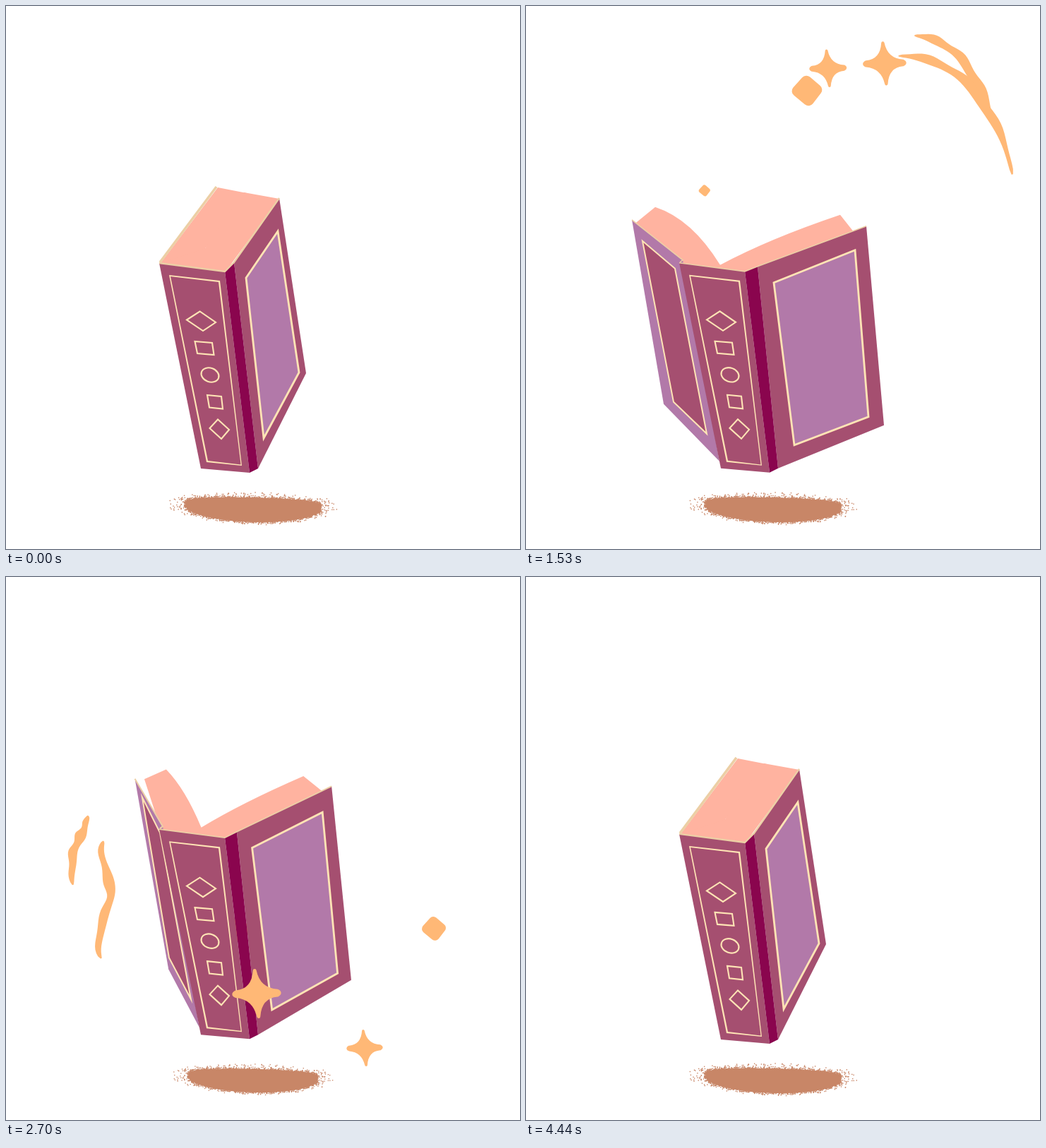
An HTML page with a canvas for the animation above (4470 ms loop, 728 by 769 pixels).

```html
<!DOCTYPE html>
<html lang="en">
<head>
<meta charset="utf-8">
<title>Floating spell book</title>
<style>
  html, body { margin: 0; width: 100%; height: 100%; overflow: hidden; background: #fff; }
  canvas { display: block; }
</style>
</head>
<body>
<canvas id="stage" width="728" height="769"></canvas>
<script>
const ctx = document.getElementById('stage').getContext('2d');
const LOOP = 4470, STEP = 30, BOB = 1490, TRAIL = 200;
const COVER = '#a54f70', HINGE = '#8a054e', LILAC = '#b279a9', CREAM = '#ffe4b5',
      EDGE = '#eccfa5', PAGE = '#ffb3a0', SPARK = '#ffb876', SHADOW = '#c88667';

const smooth = v => { v = Math.min(1, Math.max(0, v)); return v * v * (3 - 2 * v); };
const mix = (a, b, k) => a.map((v, i) => v + (b[i] - v) * k);

function trace(p) {
  ctx.beginPath();
  for (let i = 0; i < p.length; i += 2) ctx.lineTo(p[i], p[i + 1]);
}
function fill(p, color) {
  trace(p);
  ctx.fillStyle = color;
  ctx.fill();
}
function line(p, color, width, closed = true) {
  trace(p);
  if (closed) ctx.closePath();
  ctx.strokeStyle = color;
  ctx.lineWidth = width;
  ctx.stroke();
}

// A swirl turns clockwise round the book: key points [time, x, y, size] become angle and radius
const CX = 340, CY = 400;
function swirl(...points) {
  let last = -Infinity;
  return points.map(([t, x, y, size = 1]) => {
    let angle = Math.atan2(y - CY, x - CX);
    while (last > -9 && angle < last - 1) angle += 2 * Math.PI;
    last = angle;
    return [t, angle, Math.hypot(x - CX, y - CY), size];
  });
}
function locate(keys, t) {
  const end = keys.length - 1;
  t = Math.min(keys[end][0], Math.max(keys[0][0], t));
  let i = 0;
  while (i < end - 1 && keys[i + 1][0] < t) i++;
  const a = keys[i], b = keys[i + 1], span = b[0] - a[0], s = (t - a[0]) / span;
  const slope = (j, c) => {
    const p = keys[Math.max(0, j - 1)], n = keys[Math.min(end, j + 1)];
    return (n[c] - p[c]) / (n[0] - p[0]) * span;
  };
  const [angle, radius, size] = [1, 2, 3].map(c => a[c] + (b[c] - a[c]) * smooth(s)
    + slope(i, c) * s * (1 - s) ** 2 - slope(i + 1, c) * s * s * (1 - s));
  return [CX + radius * Math.cos(angle), CY + radius * Math.sin(angle), size];
}

const sparks = [
  { shape: star, keys: swirl([900, 285, 340, 0], [1140, 347, 160, 31], [1890, 671, 166, 27],
    [2700, 355, 590, 35], [3210, 97, 396, 21], [3700, 245, 310, 0]) },
  { shape: gem, keys: swirl([960, 282, 330, 0], [1140, 280, 240, 21], [1890, 591, 178, 18],
    [2700, 330, 500, 17], [3210, 89, 378, 14], [3720, 245, 310, 0]) },
  { shape: star, keys: swirl([1110, 345, 290, 0], [1140, 354, 266, 4], [1500, 420, 95, 26],
    [1890, 540, 98, 27], [2700, 508, 667, 26], [3210, 143, 487, 33], [3960, 244, 243, 31],
    [4200, 290, 330, 0]) },
  { shape: gem, keys: swirl([1300, 280, 340, 0], [1890, 313, 137, 18], [2700, 606, 498, 17],
    [3210, 224, 586, 22], [3480, 38, 430, 22], [3960, 216, 335, 21], [4150, 285, 350, 0]) }
];
const trails = [
  swirl([880, 300, 330], [940, 424, 196], [1140, 446, 98], [1400, 600, 60], [1690, 651, 352],
    [1890, 500, 510], [2500, 95, 436], [2700, 116, 338], [3010, 153, 203], [3210, 218, 205],
    [3400, 250, 310]),
  swirl([860, 285, 340], [940, 320, 203], [1140, 375, 150], [1400, 600, 90], [1690, 660, 433],
    [1890, 576, 500], [2500, 135, 540], [2600, 148, 450], [2700, 138, 374], [3000, 250, 320])
];

function blob(x, y, r, round, draw) {
  ctx.save();
  ctx.translate(x, y);
  ctx.scale(r, r);
  ctx.beginPath();
  draw();
  ctx.closePath();
  ctx.lineJoin = 'round';
  ctx.lineWidth = round;
  ctx.fillStyle = ctx.strokeStyle = SPARK;
  ctx.fill();
  ctx.stroke();
  ctx.restore();
}
function star(x, y, r) {
  blob(x, y, r, .14, () => {
    ctx.moveTo(-.08, -.93);
    ctx.quadraticCurveTo(.08, -.16, .84, -.11);
    ctx.quadraticCurveTo(1, -.03, .84, .06);
    ctx.quadraticCurveTo(.13, .12, .08, .93);
    ctx.quadraticCurveTo(-.1, .16, -.84, .1);
    ctx.quadraticCurveTo(-1, .03, -.84, -.06);
    ctx.quadraticCurveTo(-.13, -.12, -.08, -.93);
  });
}
function gem(x, y, r) {
  blob(x, y, r, .74, () => {
    for (const [px, py] of [[-.04, -.63], [.63, -.06], [.1, .62], [-.63, .02]]) ctx.lineTo(px, py);
  });
}

function drawTrail(keys, t) {
  const end = Math.min(t, keys.at(-1)[0]), start = Math.max(t - TRAIL, keys[0][0]);
  if (start >= end) return;
  const left = [], right = [], N = 40;
  for (let i = 0; i <= N; i++) {
    const u = i / N, at = start + (end - start) * u;
    const [x, y] = locate(keys, at), [ax, ay] = locate(keys, at - 3), [bx, by] = locate(keys, at + 3);
    const d = Math.hypot(bx - ax, by - ay) || 1, nx = (ay - by) / d, ny = (bx - ax) / d;
    const taper = 1 + 5.5 * Math.sqrt(Math.sin(Math.PI * u));
    const w1 = taper * (1 + .25 * Math.sin(at * .07)), w2 = taper * (1 + .3 * Math.sin(at * .11 + 2));
    left.push(x + nx * w1, y + ny * w1);
    right.unshift(x - nx * w2, y - ny * w2);
  }
  fill([...left, ...right], SPARK);
}

// Sparks low on the stage pass in front of the book
function drawSparks(t, front) {
  for (const { shape, keys } of sparks) {
    const [x, y, r] = locate(keys, t);
    if (r > .5 && (y > 530) === front) shape(x, y, r);
  }
}

// Shadow: a lopsided ellipse, flat on top, with a grainy rim
let seed = 7;
const random = () => (seed = seed * 16807 % 2147483647) / 2147483647;
function rim(angle) {
  const dx = 96 * Math.cos(angle), s = Math.sin(angle);
  return [350 + dx, 709 + .025 * dx + (s > 0 ? 22 * s : -13 * Math.sqrt(-s))];
}
const outline = Array.from({ length: 60 }, (_, i) => rim(i / 30 * Math.PI)).flat();
const grains = Array.from({ length: 900 }, () => {
  const angle = random() * 2 * Math.PI, reach = random() ** 5;
  const [x, y] = rim(angle), c = Math.cos(angle), s = Math.sin(angle);
  return [x + c * c * c * reach * 26 + random() * 2 - 1, y + s * reach * (s > 0 ? 3 : 8) + random() * 3 - 1.5];
});
function drawShadow(lift) {
  const scale = 1 - .15 * lift;
  ctx.save();
  ctx.translate(348, 710);
  ctx.scale(scale, scale);
  ctx.translate(-348, -710);
  fill(outline, SHADOW);
  for (const [x, y] of grains) ctx.fillRect(x - .7, y - .7, 1.4, 1.4);
  ctx.restore();
}

function drawPages(open) {
  // The left leaf trails slightly behind its cover
  const lag = open - .43 * open * open * (1 - open);
  const left = [219, 364], right = [311, 376];
  const gutter = mix([282, 343], [275, 367], open);
  const leaf = (k, edge, corner, bend, from, to) => {
    ctx.beginPath();
    ctx.moveTo(...from);
    ctx.lineTo(...mix(...edge, k));
    ctx.lineTo(...mix(...corner, k));
    ctx.quadraticCurveTo(...mix(...bend, k), ...gutter);
    ctx.lineTo(...to);
    ctx.fillStyle = PAGE;
    ctx.fill();
  };
  leaf(lag, [[300, 257], [156, 307]], [[341, 265], [183, 285]], [[303, 320], [235, 302]], left, right);
  leaf(open, [[387, 273], [464, 320]], [[337, 264], [445, 296]], [[300, 315], [344, 330]], right, left);
}

function drawSpine() {
  fill([217, 364, 310, 376, 345, 661, 276, 655], COVER);
  // Two offset outlines give the frame its uneven weight
  trace([231, 381, 303, 389, 334, 651, 284, 646, 231, 381, 233, 383, 301, 391, 332.6, 649.6, 286, 644, 233, 383]);
  ctx.fillStyle = CREAM;
  ctx.fill('evenodd');
  line([256, 444.5, 274.5, 432.5, 297, 448, 279, 460], CREAM, 2.1);
  line([267.5, 475, 292, 477, 294.5, 494, 271, 492], CREAM, 2.1);
  line([285, 551, 305, 553, 307, 570.5, 288, 568.5], CREAM, 2.1);
  line([288.5, 598, 300, 585.5, 316, 600, 305, 613], CREAM, 2.1);
  ctx.beginPath();
  ctx.ellipse(289, 522.5, 12.8, 9.8, .35, 0, 7);
  ctx.stroke();
}

function drawBook(open) {
  const pose = (shut, wide) => mix(shut, wide, open);
  const framed = (panel, color, width) => {
    fill(panel, color);
    line(panel, CREAM, width);
  };
  drawPages(open);

  const back = pose([298, 256, 222, 360, 274, 645, 355, 557], [150, 303, 222, 360, 274, 645, 195, 564]);
  // The back cover faces the viewer only when swung past the spine
  const facing = open > .607;
  if (facing) {
    fill(back, LILAC);
    framed(pose([292, 269, 243, 358, 283, 601, 309, 493], [165, 333, 211, 372, 256, 606, 209, 561]), COVER, 2);
  }
  line([218, 363, ...(facing ? [222, 360] : []), back[0], back[1]], EDGE, 3.6 - 2 * open, false);

  drawSpine();
  const fold = pose([323, 363], [328, 369]), tip = pose([387, 272], [482, 312]);
  fill([...fold, ...tip, ...pose([425, 520], [507, 594]), 357, 655], COVER);
  fill([310, 376, ...fold, 357, 655, 345, 661], HINGE);
  framed(pose([340, 385, 385, 319, 415, 519, 365, 612], [351, 392, 466, 346, 485, 582, 380, 622]), LILAC, 2.8);
  line([217, 364, 310, 376, ...fold, ...tip], EDGE, 2.4 - open * .8, false);
}

const begin = performance.now();
function frame() {
  const t = Math.floor((performance.now() - begin) % LOOP / STEP) * STEP;
  const lift = smooth(1 - Math.abs(t % BOB / BOB * 2 - 1));
  const open = smooth(t / 1367) - smooth((t - 2247) / 1495);

  ctx.fillStyle = '#fff';
  ctx.fillRect(0, 0, 728, 769);
  drawShadow(lift);
  for (const keys of trails) drawTrail(keys, t);
  drawSparks(t, false);
  ctx.save();
  ctx.translate(0, -21.6 * lift);
  drawBook(open);
  ctx.restore();
  drawSparks(t, true);
  requestAnimationFrame(frame);
}
frame();
</script>
</body>
</html>
```
